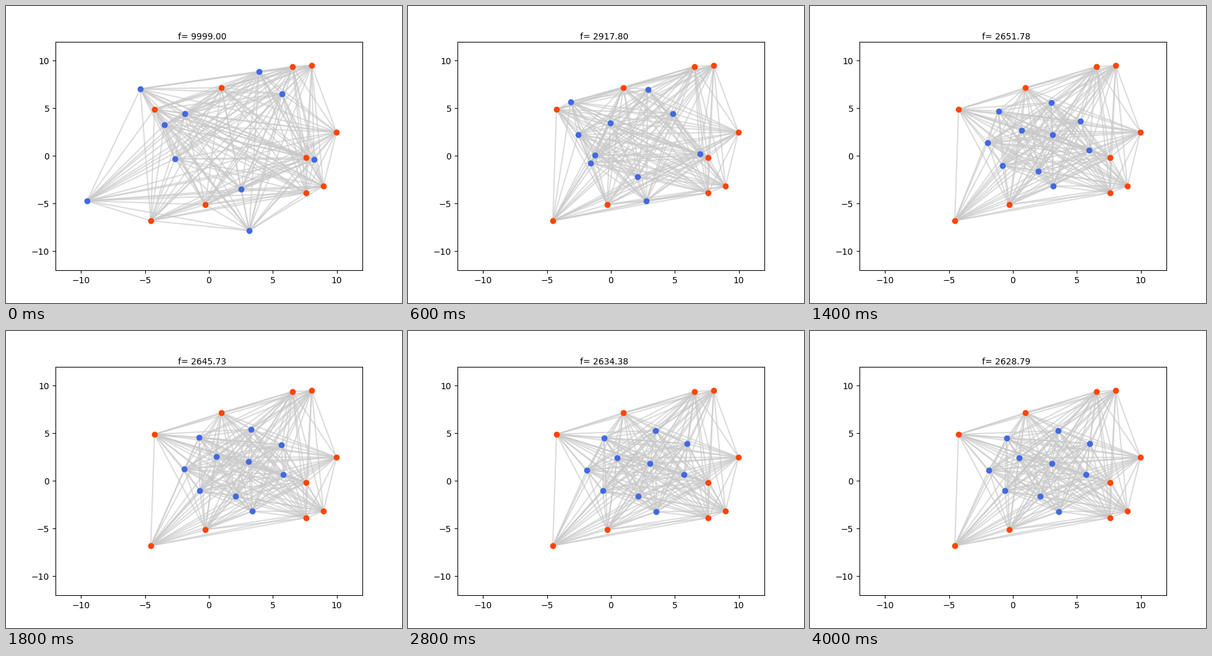
A matplotlib script for the animation above (4100 ms loop, 640 by 480 pixels).

```python
from itertools import combinations

import numpy as np
import matplotlib.pyplot as plt
from matplotlib.animation import FuncAnimation
from matplotlib.collections import LineCollection

FRAMES, INTERVAL = 41, 100
LIMIT = 12
TURN = 10     # frame at which the fast approach gives way to a slow drift
DECAY = 5     # time constant of the drift, in frames


def nodes(*pixels):
    """Turn stage pixels (y down) into axes data."""
    x, y = np.array(pixels, dtype=float).T
    return np.column_stack([((x - 80) / 248 - 1) * LIMIT,
                            (1 - (y - 57.6) / 184.8) * LIMIT])


fixed = nodes((240, 167), (348, 132), (463, 98), (494, 96), (534, 204),
              (485, 245), (513, 291), (485, 302), (322, 321), (234, 347))
start = nodes((217, 134), (256, 192), (289, 174), (273, 247), (131, 315),
              (409, 106), (446, 142), (498, 248), (380, 296), (393, 363))
turn = nodes((288, 166), (285, 216), (347, 197), (307, 257), (394, 201),
             (376, 150), (419, 191), (458, 234), (366, 266), (381, 289))
end = nodes((318, 173), (289, 225), (338, 205), (315, 258), (391, 214),
            (401, 161), (452, 182), (446, 232), (372, 267), (402, 292))

# Cost excess over the floor falls exponentially between these (frame, cost)
COST_FLOOR = 2620
COST_POINTS = np.array([(1, 3560), (6, 2917.80), (10, 2696.07), (14, 2651.78),
                        (22, 2640.83), (34, 2629.93), (40, 2628.79)])


def moving_nodes(frame):
    if frame < TURN:
        progress = 1 - (1 - frame / TURN) ** 1.15
        return start + (turn - start) * progress
    return end + (turn - end) * np.exp((TURN - frame) / DECAY)


def cost(frame):
    if frame == 0:
        return 9999
    times, costs = COST_POINTS.T
    return COST_FLOOR + np.exp(np.interp(frame, times, np.log(costs - COST_FLOOR)))


fig, ax = plt.subplots(figsize=(6.4, 4.8), dpi=100)
ax.set(xlim=(-LIMIT, LIMIT), ylim=(-LIMIT, LIMIT))

edges = LineCollection([], colors="#c8c8c8", linewidths=1.5, alpha=0.65, zorder=1)
ax.add_collection(edges)
moving_dots, = ax.plot([], [], "o", color="royalblue", zorder=3)
ax.plot(*fixed.T, "o", color="orangered", zorder=4)
label = ax.text(0.4, 1.01, "", transform=ax.transAxes)

pairs = np.array(list(combinations(range(len(fixed) + len(start)), 2)))


def update(frame):
    moving = moving_nodes(frame)
    edges.set_segments(np.concatenate([fixed, moving])[pairs])
    moving_dots.set_data(*moving.T)
    label.set_text(f"f= {cost(frame):.2f}")
    return edges, moving_dots, label


anim = FuncAnimation(fig, update, frames=FRAMES, interval=INTERVAL,
                     repeat=True, repeat_delay=0)
plt.show()
```
